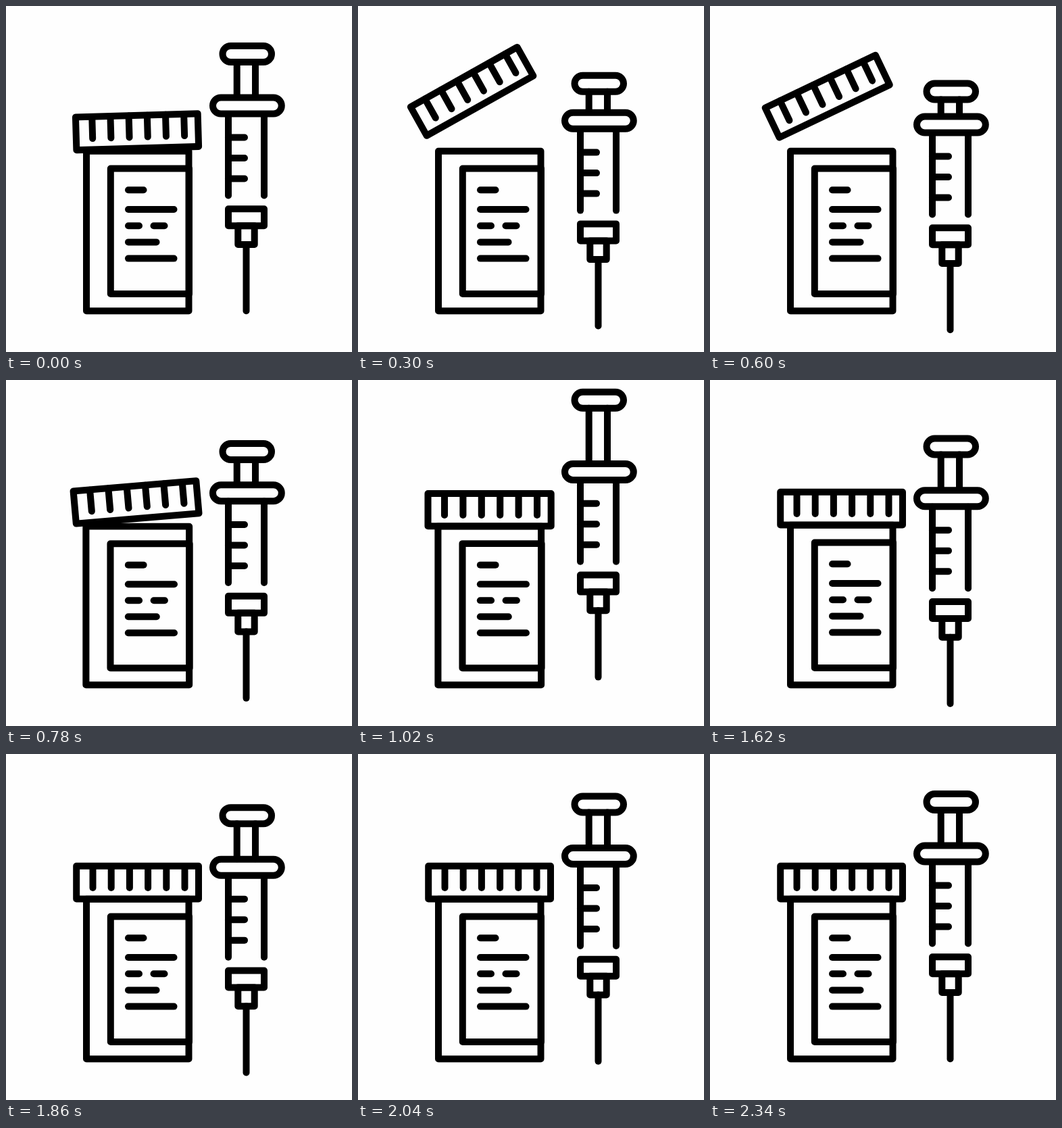
An HTML page with a canvas that plays this animation: 512 by 512 pixels, repeating every 2.7 s.

```html
<!DOCTYPE html>
<html lang="en">
<head>
<meta charset="utf-8">
<title>Medicine bottle and syringe</title>
<style>
  html, body { margin: 0; width: 100%; height: 100%; overflow: hidden; background: #fefefe; }
  canvas { display: block; width: 512px; height: 512px; }
</style>
</head>
<body>
<canvas id="stage" width="512" height="512"></canvas>
<script>
const ctx = document.getElementById('stage').getContext('2d');
const LOOP = 2700, STEP = 60, LAST = 2340;

const clamp = u => Math.min(1, Math.max(0, u));
const easeInOut = power => u => u < 0.5
  ? 2 ** (power - 1) * u ** power
  : 1 - (2 - 2 * u) ** power / 2;
const cubic = easeInOut(3), quad = easeInOut(2);

// Each move is [start, end, target, ease]; moves run one after another.
function track(t, from, moves) {
  let value = from;
  for (const [start, end, target, ease = cubic] of moves) {
    value += (target - value) * ease(clamp((t - start) / (end - start)));
  }
  return value;
}

function line(x1, y1, x2, y2) {
  ctx.beginPath();
  ctx.moveTo(x1, y1);
  ctx.lineTo(x2, y2);
  ctx.stroke();
}

function box(left, top, right, bottom) {
  ctx.strokeRect(left, top, right - left, bottom - top);
}

function pill(left, right, y, r) {
  ctx.beginPath();
  ctx.arc(left + r, y, r, Math.PI / 2, Math.PI * 1.5);
  ctx.arc(right - r, y, r, -Math.PI / 2, Math.PI / 2);
  ctx.closePath();
  ctx.stroke();
}

function drawCap(degrees) {
  ctx.save();
  ctx.translate(59.5, 208);
  ctx.rotate(-degrees * Math.PI / 180);
  ctx.translate(-59.5, -208);
  box(104.2, 165.8, 285, 214.5);
  for (let i = 0; i < 6; i++) line(128.5 + i * 27.2, 166, 128.5 + i * 27.2, 198);
  ctx.restore();
}

function drawBottle(t) {
  const squash = 0.01 * Math.sin(Math.PI * clamp((t - 600) / 580));
  const tilt = track(t, 0, [[-125, 395, 30], [413, 973, 0]]);
  ctx.save();
  ctx.translate(194.7, 451.3);
  ctx.scale(1 + squash, 1 - squash);
  ctx.translate(-194.7, -451.3);
  box(119, 214.7, 270.5, 451.3);
  box(154.8, 240.5, 271, 426);
  line(181, 272.3, 203.5, 272.3);
  line(181, 301, 248.5, 301);
  line(181, 325.2, 197, 325.2);
  line(218.5, 325.2, 234.5, 325.2);
  line(181, 349.4, 222.5, 349.4);
  line(181, 373.6, 248.5, 373.6);
  drawCap(tilt);
  ctx.restore();
}

function drawSyringe(t) {
  const body = track(t, 0, [
    [0, 480, 28], [600, 1080, -12], [1215, 1680, 28], [1680, 2160, 0, quad]]);
  const plunger = track(t, 0, [
    [0, 480, 55.5], [600, 1080, -42], [1215, 1680, 28], [1680, 2160, 0, quad]]);

  pill(320.5, 393, 71 + plunger, 12);
  for (const x of [341.7, 369]) line(x, 83 + plunger, x, 135 + body);

  ctx.save();
  ctx.translate(0, body);
  pill(306, 407.8, 147.6, 12);
  for (const x of [329, 382]) line(x, 160, x, 280.5);
  for (let i = 0; i < 3; i++) line(329, 194.5 + i * 30.5, 353, 194.5 + i * 30.5);
  box(329, 300.3, 382, 325.3);
  box(343.3, 325.3, 367.7, 353);
  line(355.5, 353, 355.5, 451.3);
  ctx.restore();
}

function draw(now) {
  const t = Math.min(LAST, Math.floor((now % LOOP) / STEP) * STEP);
  ctx.fillStyle = '#fefefe';
  ctx.fillRect(0, 0, 512, 512);
  ctx.strokeStyle = '#000';
  ctx.lineWidth = 10;
  ctx.lineCap = ctx.lineJoin = 'round';
  drawBottle(t);
  drawSyringe(t);
}

const begin = performance.now();
function tick() {
  draw(performance.now() - begin);
  requestAnimationFrame(tick);
}
tick();
</script>
</body>
</html>
```
